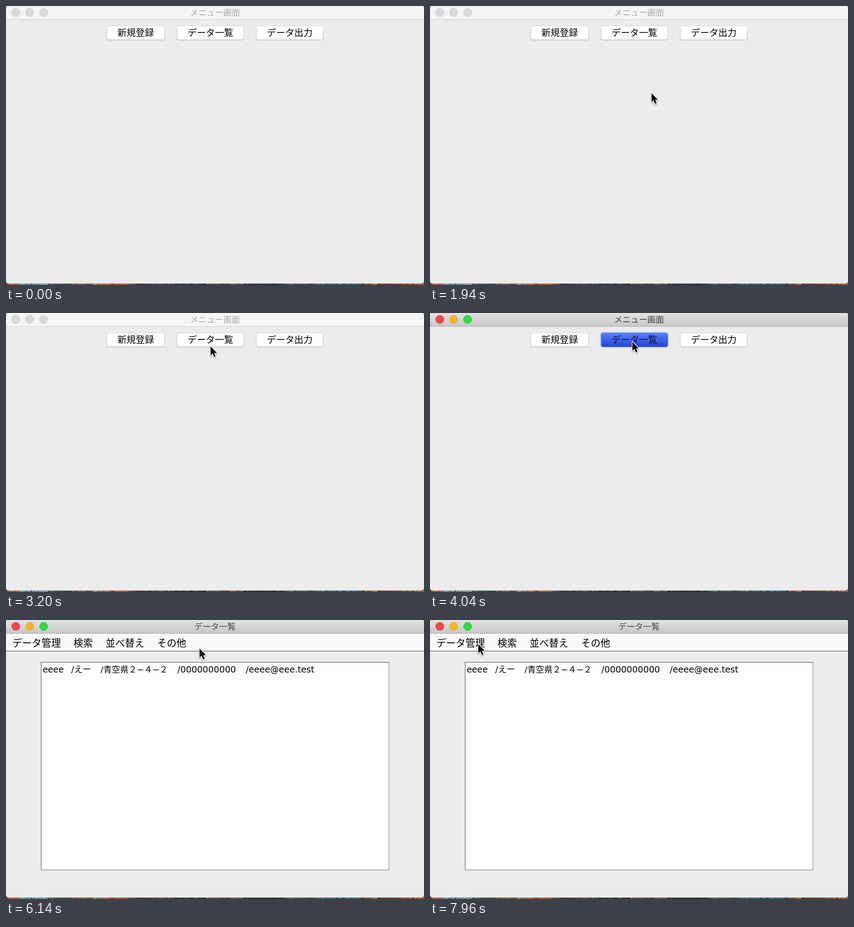
Write an HTML page with a canvas that moves like this. It is 917x611 px and loops after 8 s.

```html
<!DOCTYPE html>
<html lang="ja">
<head>
<meta charset="utf-8">
<style>
html, body { margin: 0; width: 100%; height: 100%; overflow: hidden; background: #ececec; }
canvas { display: block; }
</style>
</head>
<body>
<canvas id="stage" width="917" height="611"></canvas>
<script>
const ctx = document.getElementById('stage').getContext('2d');
const W = 917, H = 611, LOOP = 8000;
const ACTIVATE = 3800, OPEN_LIST = 4060;
const JP = '"Noto Sans CJK JP", "Noto Sans CJK", sans-serif';
const LATIN = '"DejaVu Sans", ' + JP;

// Cursor moves: start, end, from x, from y, to x, to y, ease power
const MOVES = [
  [540, 960, 578, 545, 506, 254, 2],
  [1780, 2540, 506, 254, 457, 99, 2.2],
  [2620, 2920, 457, 99, 453, 82, 1.5],
  [3040, 3640, 453, 82, 444, 63, 2],
  [4060, 4460, 444, 63, 441, 63, 1.5],
  [6120, 6880, 441, 63, 141, 54, 2],
  [6960, 7540, 141, 54, 106, 53, 2]
];

// Desktop strip under the window: start x, colour
const DESKTOP = [
  [0, '#a5583a'], [32, '#6d9a9a'], [92, '#3c5550'], [140, '#74563f'],
  [186, '#a87f62'], [213, '#b0562c'], [272, '#4b4340'], [360, '#35383a'],
  [440, '#594c40'], [520, '#34383b'], [610, '#45605e'], [690, '#376a6b'],
  [785, '#b06a40'], [815, '#74402c'], [870, '#a04e2c']
];

function text(str, x, y, size, color, family = JP, align = 'left') {
  ctx.font = `${size}px ${family}`;
  ctx.textAlign = align;
  ctx.fillStyle = color;
  ctx.fillText(str, x, y);
}

function rect(x, y, w, h, fill) {
  ctx.fillStyle = fill;
  ctx.fillRect(x, y, w, h);
}

function box(x, y, w, h, r, fill) {
  ctx.beginPath();
  ctx.roundRect(x, y, w, h, r);
  ctx.fillStyle = fill;
  ctx.fill();
}

function vertical(y0, y1, top, bottom) {
  const g = ctx.createLinearGradient(0, y0, 0, y1);
  g.addColorStop(0, top);
  g.addColorStop(1, bottom);
  return g;
}

function drawDesktop() {
  rect(0, 0, W, H, '#6f6a66');
  let seed = 7;
  const rand = () => (seed = (seed * 16807) % 2147483647) / 2147483647;
  DESKTOP.forEach(([x0, color], i) => {
    const x1 = i + 1 < DESKTOP.length ? DESKTOP[i + 1][0] : W;
    rect(x0, 600, x1 - x0, 11, color);
    for (let x = x0; x < x1; x += 2 + rand() * 5) {
      const tint = rand() < 0.75 ? `rgba(0,0,0,${rand() * 0.45})` : `rgba(255,255,255,${rand() * 0.15})`;
      rect(x, 606, 1 + rand() * 4, 5, tint);
    }
  });
}

function drawTitleBar(title, active, color) {
  rect(0, 0, W, 30, active ? vertical(0, 29, '#e2e2e2', '#c8c8c8') : '#f5f5f5');
  rect(0, 29, W, 1, active ? '#ababab' : '#cfcfcf');
  const fills = active ? ['#f1474f', '#f4b52d', '#31d944'] : ['#d9d9d9', '#d9d9d9', '#d9d9d9'];
  const rims = active ? ['#e2414a', '#e3a627', '#2ac53c'] : ['#c5c5c5', '#c5c5c5', '#c5c5c5'];
  fills.forEach((fill, i) => {
    ctx.beginPath();
    ctx.arc(21.5 + i * 30.5, 14, 9, 0, Math.PI * 2);
    ctx.fillStyle = fill;
    ctx.fill();
    ctx.strokeStyle = rims[i];
    ctx.lineWidth = 1;
    ctx.stroke();
  });
  text(title, 458.5, 21.3, 18.2, color, JP, 'center');
}

function drawButton(label, x, w, pressed) {
  if (pressed) {
    box(x - 1, 42, w + 2, 33.5, 5.5, '#8fb2f6');
    box(x + 0.5, 43.5, w - 1, 30.5, 4.5, vertical(43, 74, '#5a80f6', '#2443da'));
  } else {
    box(x - 0.5, 43, w + 1, 32, 5, vertical(43, 75, '#d2d2d2', '#b2b2b2'));
    box(x + 0.5, 44, w - 1, 29.8, 4.3, '#ffffff');
  }
  text(label, x + w / 2, 65.8, 20, pressed ? '#0b1033' : '#000', JP, 'center');
}

function drawMenu(active) {
  drawTitleBar('メニュー画面', active, active ? '#3c3c3c' : '#a9a9a9');
  drawButton('新規登録', 221, 127, false);
  drawButton('データ一覧', 375, 147, active);
  drawButton('データ出力', 549, 147, false);
}

function drawList() {
  drawTitleBar('データ一覧', true, '#424242');
  rect(0, 30, W, 38, '#f9f9f9');
  rect(0, 67, W, 1, '#b4b4b4');
  rect(0, 68, W, 1, '#6e6e6e');
  text('データ管理', 14, 57.5, 21.3, '#000');
  text('検索', 148, 57.5, 21.3, '#000');
  text('並べ替え', 218.5, 57.5, 21.3, '#000');
  text('その他', 331.5, 57.5, 21.3, '#000');

  rect(76.5, 92, 764, 456, '#7c7c7c');
  rect(76.5, 92, 764, 1.2, '#555');
  rect(78, 93.2, 761.5, 453.6, '#fff');
  text('eeee', 80.5, 115, 18.8, '#000', LATIN);
  text('/えー', 143, 115, 18.8, '#000', LATIN);
  text('/青空県２−４−２', 207.5, 115, 18.4, '#000', LATIN);
  text('/0000000000', 376, 115, 19.2, '#000', LATIN);
  text('/eeee@eee.test', 526, 115, 19.1, '#000', LATIN);
}

function drawCursor(t) {
  if (t < 560) return;
  let x, y;
  for (const [start, end, x0, y0, x1, y1, power] of MOVES) {
    if (t < start) break;
    const k = 1 - Math.pow(1 - Math.min(1, (t - start) / (end - start)), power);
    x = x0 + (x1 - x0) * k;
    y = y0 + (y1 - y0) * k;
  }
  ctx.save();
  ctx.translate(x, y);
  const arrow = new Path2D('M0 0V19.5L4.5 15.6L7.9 23.4L11.1 22L7.8 14.4H13.8Z');
  ctx.lineJoin = 'round';
  ctx.lineWidth = 2.6;
  ctx.strokeStyle = '#fff';
  ctx.shadowColor = 'rgba(0,0,0,0.4)';
  ctx.shadowBlur = 3;
  ctx.shadowOffsetY = 1.5;
  ctx.stroke(arrow);
  ctx.shadowColor = 'transparent';
  ctx.fillStyle = '#000';
  ctx.fill(arrow);
  ctx.restore();
}

function draw(t) {
  drawDesktop();
  box(0, -1, W, 609.3, 6, '#a9a9a9');
  ctx.save();
  ctx.beginPath();
  ctx.roundRect(0, -1, W, 608.5, 6);
  ctx.clip();
  rect(0, 0, W, H, '#ececec');
  if (t < OPEN_LIST) drawMenu(t >= ACTIVATE);
  else drawList();
  ctx.restore();
  drawCursor(t);
}

const began = performance.now();
function tick() {
  draw((performance.now() - began) % LOOP);
  requestAnimationFrame(tick);
}
tick();
</script>
</body>
</html>
```
